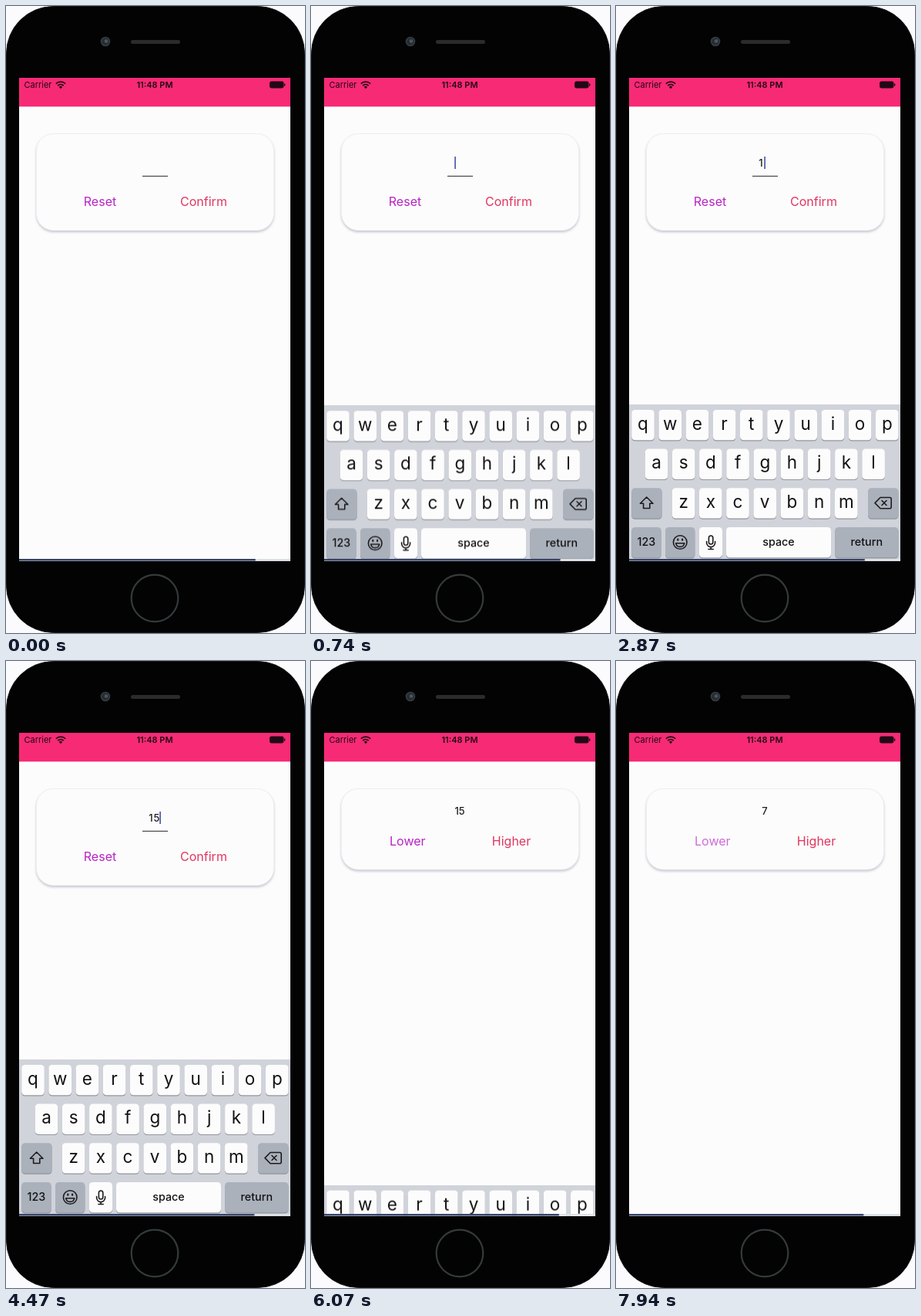
An HTML page that plays this animation: 388x812 px, repeating every 8000 ms.

```html
<!DOCTYPE html>
<html lang="en">
<head>
<meta charset="utf-8">
<title>Guess a number</title>
<style>
html, body { margin: 0; width: 100%; height: 100%; overflow: hidden; background: #fbfbfd; }
svg { display: block; width: 388px; height: 812px; font-family: Inter, Roboto, sans-serif; }
.mid { text-anchor: middle; }
.btn { font-size: 16px; text-anchor: middle; }
.purple { fill: #b824c4; }
.red { fill: #e0355f; }
.num { font-size: 13px; font-weight: 500; fill: #202022; }
.card { fill: #fcfcfc; stroke: #eeeef3; filter: drop-shadow(0 2px 1.5px rgba(60, 60, 100, .27)); }
.line { fill: none; stroke: #1c1c1e; stroke-width: 1.6; stroke-linecap: round; stroke-linejoin: round; }
.letter { font-size: 22.5px; text-anchor: middle; fill: #121214; }
.label { font-size: 14.3px; font-weight: 500; text-anchor: middle; fill: #121214; }

/* Percentages are of the 8 s loop: 1% = 80 ms. */
.anim { animation: 8s linear infinite; }
.step { animation: 8s step-end infinite; }
#keyboard { animation-name: slide; }
#setup { animation-name: setup; }
#guess { animation-name: guess; }
#one { animation-name: one; }
#five { animation-name: five; }
#caret { animation-name: blink, caretMove; }
#confirm { animation-name: confirm; }
#lower { animation-name: lower; }
#first { animation-name: first; }
#second { animation-name: second; }
#bar { animation-name: bar; transform-origin: 17px 0; }

@keyframes slide {
  0% { transform: translateY(202px); }
  4.3125% { transform: translateY(202px); animation-timing-function: cubic-bezier(.2, .7, .1, 1); }
  10.5625% { transform: translateY(0); }
  74.025% { transform: translateY(0); animation-timing-function: cubic-bezier(.2, .7, .1, 1); }
  80.9%, 100% { transform: translateY(202px); }
}
@keyframes setup { 0% { opacity: 1; } 73.625%, 100% { opacity: 0; } }
@keyframes guess { 0% { opacity: 0; } 73.625%, 100% { opacity: 1; } }
@keyframes one { 0% { opacity: 0; } 32.5%, 100% { opacity: 1; } }
@keyframes five { 0% { opacity: 0; } 38.75%, 100% { opacity: 1; } }
@keyframes blink {
  0%, 11.25%, 23.75%, 46.25%, 58.75%, 71.25%, 100% { opacity: 0; }
  3.75%, 16.25%, 28.75%, 51.25%, 63.75% { opacity: 1; }
}
@keyframes caretMove {
  0% { transform: translateX(0); }
  32.5% { transform: translateX(6px); }
  38.75%, 100% { transform: translateX(13px); }
}
@keyframes confirm { 0%, 71.25% { opacity: 1; } 73.125%, 100% { opacity: .2; } }
@keyframes lower { 0%, 95% { opacity: 1; } 96.875%, 97.69% { opacity: .2; } 100% { opacity: .89; } }
@keyframes first { 0% { opacity: 1; } 97.69%, 100% { opacity: 0; } }
@keyframes second { 0% { opacity: 0; } 97.69%, 100% { opacity: 1; } }
@keyframes bar { from { transform: scaleX(1); } to { transform: scaleX(.992); } }
</style>
</head>
<body>
<svg viewBox="0 0 388 812">
  <defs>
    <clipPath id="screen"><rect x="17" y="93" width="352" height="625.5"/></clipPath>
  </defs>

  <!-- phone -->
  <rect x=".5" y=".5" width="387" height="811" rx="61" fill="#030303" stroke="#15151a"/>
  <circle cx="129" cy="46" r="5.5" fill="#262c34" stroke="#363c42" stroke-width="1.6"/>
  <circle cx="130" cy="45.5" r="2.3" fill="#4c5662"/>
  <rect x="162" y="44" width="64" height="5" rx="2.5" fill="#2a2c2a"/>
  <circle cx="193" cy="767" r="30.3" fill="none" stroke="#343a3c" stroke-width="2.2"/>

  <g clip-path="url(#screen)">
    <rect x="17" y="93" width="352" height="626" fill="#fcfcfc"/>
    <rect x="17" y="93" width="352" height="37.3" fill="#f72a76"/>

    <!-- status bar -->
    <g fill="#220816" font-size="11">
      <text x="23.5" y="106.3">Carrier</text>
      <text x="193" y="106.3" class="mid" font-weight="600">11:48 PM</text>
      <path d="M71 107.2l-2.2-2.4a3.2 3.2 0 0 1 4.4 0z"/>
      <g fill="none" stroke="#220816" stroke-width="1.7">
        <path d="M67.2 103.2a5.5 5.5 0 0 1 7.6 0"/>
        <path d="M64.8 100.6a9 9 0 0 1 12.4 0"/>
      </g>
      <rect x="342" y="97.5" width="18.5" height="9" rx="2.4"/>
      <rect x="361" y="100.3" width="1.3" height="3.4" rx=".6"/>
    </g>

    <!-- number entry -->
    <g id="setup" class="step">
      <rect class="card" x="39.5" y="165.5" width="308" height="125" rx="22"/>
      <rect x="177" y="219.8" width="33" height="1.2" fill="#48484e"/>
      <text id="one" class="num step" x="185.3" y="208">1</text>
      <text id="five" class="num step" x="191.5" y="208">5</text>
      <rect id="caret" class="step" x="186.3" y="195" width="1.6" height="16" fill="#4452a4"/>
      <text class="btn purple" x="122" y="259">Reset</text>
      <text id="confirm" class="btn red anim" x="256.5" y="259">Confirm</text>
    </g>

    <!-- guessing -->
    <g id="guess" class="step">
      <rect class="card" x="39.5" y="165.5" width="308" height="104.5" rx="22"/>
      <g class="num mid">
        <text id="first" class="step" x="193" y="198.6">15</text>
        <text id="second" class="step" x="193" y="198.6">7</text>
      </g>
      <text id="lower" class="btn purple anim" x="125.3" y="239">Lower</text>
      <text class="btn red" x="260" y="239">Higher</text>
    </g>

    <g id="keyboard" class="anim">
      <rect x="17" y="516" width="352" height="203" fill="#d0d3da"/>
      <g id="keys"></g>
      <path class="line" d="M39.7 636l8.3 8.2h-4.2v6.3h-8.2v-6.3h-4.2z"/>
      <path class="line" d="M343 636.5h12.2a2 2 0 0 1 2 2v10.2a2 2 0 0 1-2 2h-12.2l-7-7.1zM345 640.5l6 6M351 640.5l-6 6"/>
      <g class="line" stroke-width="1.4">
        <circle cx="83.2" cy="694.5" r="8.8"/>
        <path d="M77.7 695.8a5.6 5.6 0 0 0 11 0z"/>
        <path d="M80.3 690.5v1.2M86.1 690.5v1.2" stroke-width="2.2"/>
        <rect x="120.4" y="686" width="5.4" height="11" rx="2.7"/>
        <path d="M117.6 693.5v1.6a5.5 5.5 0 0 0 11 0v-1.6M123.1 700.5v3M120 703.5h6.2"/>
      </g>
    </g>

    <rect x="17" y="716" width="352" height="2.5" fill="#dde2e6"/>
    <rect id="bar" class="anim" x="17" y="716" width="306.7" height="2.5" fill="#38446a"/>
  </g>
</svg>
<script>
const keys = document.getElementById('keys');

function add(tag, attrs, text = '') {
  const el = document.createElementNS('http://www.w3.org/2000/svg', tag);
  for (const name in attrs) el.setAttribute(name, attrs[name]);
  el.textContent = text;
  keys.append(el);
}

function key(x, y, width, label = '', dark = false) {
  const box = { x, width, height: 39.3, rx: 4.5 };
  add('rect', { ...box, y: y + 1.2, fill: '#92959c' });
  add('rect', { ...box, y, fill: dark ? '#abb1bb' : '#fcfcfc' });
  const single = label.length === 1;
  add('text', {
    x: x + width / 2,
    y: y + (single ? 25.6 : 24.4),
    class: single ? 'letter' : 'label'
  }, label);
}

[['qwertyuiop', 20.2], ['asdfghjkl', 37.7], ['zxcvbnm', 72.8]].forEach(([row, left], r) => {
  [...row].forEach((c, i) => key(left + i * 35.2, 523 + r * 50.6, 29.6, c));
});

key(20.2, 624.2, 39.4, '', true);
key(327, 624.2, 39.4, '', true);
key(20.2, 675, 38.4, '123', true);
key(64, 675, 38.4, '', true);
key(108, 675, 30);
key(143, 675, 136, 'space');
key(284.2, 675, 82.2, 'return', true);
</script>
</body>
</html>
```
